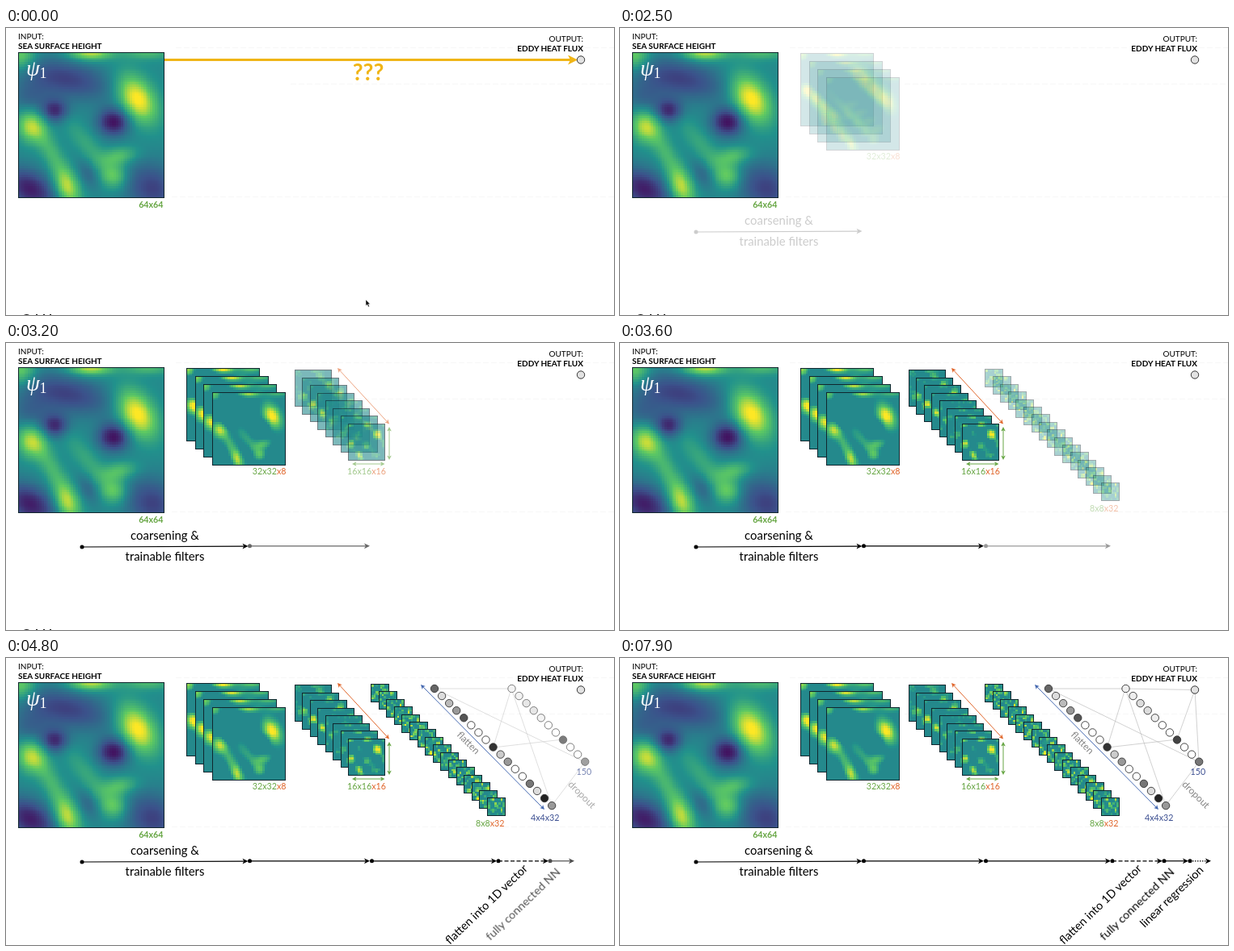
These frames come from a looping animation (752x356 px, 8 s). An HTML page with a canvas:

```html
<!DOCTYPE html>
<html lang="en">
<head>
<meta charset="utf-8">
<title>Eddy heat flux network</title>
<style>
  html, body { margin: 0; width: 100%; height: 100%; overflow: hidden; background: #fff; }
  #stage { position: relative; width: 752px; height: 356px; overflow: hidden; }
  canvas { position: absolute; box-sizing: border-box; border: 1px solid #10262e; image-rendering: pixelated; }
  svg { position: absolute; left: 0; top: 0; }
  text { font-family: Lato, "Open Sans", sans-serif; }
  .title { font-size: 10px; }
  .size { font-size: 10.7px; fill: #67a644; }
  .big { font-size: 14.9px; }
  .slant { font-size: 14.3px; }
  .note { font-size: 12px; fill: #858585; text-anchor: middle; }
  .psi { font-family: "Liberation Serif", serif; fill: #fff; }
  .mid { text-anchor: middle; }
  .end { text-anchor: end; }
  .bold { font-weight: 700; }
  .orange { fill: #e0662b; }
  .blue { fill: #3c4f91; }
</style>
</head>
<body>
<div id="stage">
  <svg width="752" height="356" viewBox="0 0 752 356">
    <path d="M210 24.5H630M716 24.5H752M352 69.5H752M205 209.5H752" stroke="#f7f7f7" stroke-dasharray="7 3"/>
  </svg>
  <div id="tiles"></div>
  <svg width="752" height="356" viewBox="0 0 752 356">
    <path id="caption" d="M22 356q3.5-2 7 0zM37 355h2v1h-2zM46 355h2v1h-2zM54 355h2v1h-2z" fill="#222"/>
    <text class="title" x="15" y="14">INPUT:</text>
    <text class="title bold" x="15" y="25.5">SEA SURFACE HEIGHT</text>
    <text class="title end" x="714" y="17">OUTPUT:</text>
    <text class="title bold end" x="714" y="28.5">EDDY HEAT FLUX</text>
    <text class="size end bold" x="194.5" y="223">64x64</text>
    <text class="psi" x="25" y="59" font-size="27" font-style="italic">ψ</text>
    <text class="psi" x="41.5" y="62" font-size="18">1</text>

    <g id="question">
      <text class="mid bold" x="448" y="65" font-size="28" fill="#f0b516">???</text>
    </g>
    <g id="stage6">
      <text class="slant" transform="translate(649 335) rotate(-44)">linear regression</text>
    </g>
    <g id="stage5">
      <text class="size blue" x="705.5" y="145">150</text>
      <text class="note" transform="translate(709.5 172.5) rotate(45)">dropout</text>
      <text class="slant" transform="translate(599 351) rotate(-44)">fully connected NN</text>
    </g>
    <g id="stage4">
      <text class="size blue" x="649" y="202">4x4x32</text>
      <text class="note" transform="translate(569 108) rotate(45)">flatten</text>
      <text class="slant" transform="translate(549 356) rotate(-44)">flatten into 1D vector</text>
    </g>
    <g id="stage3">
      <text class="size" x="581" y="209">8x8<tspan class="orange">x32</tspan></text>
    </g>
    <g id="stage2">
      <text class="size" x="422" y="163">16x16<tspan class="orange">x16</tspan></text>
    </g>
    <g id="stage1">
      <text class="size end" x="346.5" y="163">32x32<tspan class="orange">x8</tspan></text>
      <text class="big mid" x="196.5" y="244">coarsening &amp;</text>
      <text class="big mid" x="196.5" y="270">trainable filters</text>
    </g>
    <circle cx="711" cy="39.5" r="4.7" fill="#e2e2e2" stroke="#333"/>
    <path id="cursor" d="M445 337v7.5l1.8-1.6 1.3 3 1.3-.6-1.3-2.8h2.3z" fill="#111" stroke="#fff" stroke-width=".4"/>
  </svg>
</div>
<script>
const LOOP = 8000;
const FADE = 500;
const STARTS = [2400, 2900, 3400, 3900, 4450, 5050];
const BASE = 0.47;
const byId = id => document.getElementById(id);
const group = n => byId('stage' + n);
const add = (node, markup) => node.insertAdjacentHTML('afterbegin', markup);

// Timeline helpers

function play(node, frames) {
  node.animate(frames, { duration: LOOP, iterations: Infinity });
}

function fadeIn(node, n) {
  const start = STARTS[n - 1];
  play(node, [
    { opacity: 0, offset: 0 },
    { opacity: 0, offset: start / LOOP, easing: 'steps(10, end)' },
    { opacity: 1, offset: (start + FADE) / LOOP },
    { opacity: 1, offset: 1 }
  ]);
}

function hideAt(node, time) {
  play(node, [
    { opacity: 1, offset: 0, easing: 'step-end' },
    { opacity: 0, offset: time / LOOP },
    { opacity: 0, offset: 1 }
  ]);
}

// Height field and feature maps

const VIRIDIS = [[68, 1, 84], [59, 82, 139], [33, 145, 140], [94, 201, 98], [253, 231, 37]];

function viridis(v) {
  const s = Math.min(0.9999, Math.max(0, v)) * 4;
  const i = Math.floor(s);
  return VIRIDIS[i].map((c, k) => c + (VIRIDIS[i + 1][k] - c) * (s - i));
}

// x, y, height, long radius, short radius, angle
const BLOBS = [
  [147, 57, .57, 31, 20, 58], [16, 92, .43, 20, 17, 60], [40, 124, .18, 30, 12, 62],
  [60, 167, .44, 25, 14, 70], [118, 153, .27, 16, 15, 0], [124, 129, .24, 22, 11, -10],
  [88, 119, .13, 46, 13, 52], [45, 72, -.34, 16, 14, 0], [118, 86, -.42, 19, 17, 0],
  [58, 32, -.27, 58, 23, 12], [14, 56, -.14, 26, 20, 0], [14, 170, -.38, 34, 22, 30],
  [166, 169, -.27, 36, 30, 30], [89, -1, .45, 26, 10, 0], [2, 3, .32, 18, 18, 0],
  [160, -2, .22, 30, 10, 0], [86, 151, -.13, 20, 12, 60]
];

function height(x, y) {
  return BLOBS.reduce((sum, [bx, by, amp, rx, ry, deg]) => {
    const a = deg * Math.PI / 180, dx = x - bx, dy = y - by;
    const u = (dx * Math.cos(a) + dy * Math.sin(a)) / rx;
    const v = (dy * Math.cos(a) - dx * Math.sin(a)) / ry;
    return sum + amp * Math.exp(-u * u - v * v);
  }, 0);
}

let seed = 7;
function random() {
  seed = (seed * 16807) % 2147483647;
  return seed / 2147483647;
}

function tile(x, y, size, cells, value) {
  const canvas = document.createElement('canvas');
  canvas.width = canvas.height = cells;
  canvas.style.cssText = `left:${x}px;top:${y}px;width:${size}px;height:${size}px`;
  const ctx = canvas.getContext('2d');
  const step = 180 / cells;
  for (let j = 0; j < cells; j++) {
    for (let i = 0; i < cells; i++) {
      ctx.fillStyle = `rgb(${viridis(value((i + .5) * step, (j + .5) * step)).map(Math.round)})`;
      ctx.fillRect(i, j, 1, 1);
    }
  }
  byId('tiles').append(canvas);
  return canvas;
}

function stack(n, count, [x0, y0], [x1, y1], size, cells, makeFilter) {
  for (let k = 0; k < count; k++) {
    const p = k / (count - 1);
    fadeIn(tile(x0 + (x1 - x0) * p, y0 + (y1 - y0) * p, size, cells, makeFilter(k)), n);
  }
}

const relu = v => BASE + Math.max(0, v);
const ripple = (x, y, k) => Math.sin(x / 15 + k * 2) * Math.sin(y / 18 + k * 3);

tile(15, 30, 181, 64, (x, y) => BASE + height(x, y));
stack(1, 4, [223, 31], [255, 61], 91, 32, k => (x, y) =>
  relu(height(x, y) * (1.1 + (3 - k) * .12) - .03));
stack(2, 8, [357, 33], [423, 100], 46, 16, k => (x, y) =>
  relu(height(x, y) * .7 + ripple(x, y, k) * .28 + random() * .12 - .12));
stack(3, 16, [451, 32], [595, 173], 23, 8, k => (x, y) =>
  relu(height(x, y) * .4 + ripple(x, y, k) * .25 + random() * .5 - .22));

// Arrows, lines and nodes

function head(x, y, angle, color, long, wide) {
  return `<path transform="translate(${x} ${y}) rotate(${angle})" fill="${color}"
    d="M0 0L${-long} ${-wide}L${-long * .75} 0L${-long} ${wide}z"/>`;
}

function arrow(x1, y1, x2, y2, { color = '#000', width = 1, dash = 'none', both = false, long = 7, wide = 3 } = {}) {
  const angle = Math.atan2(y2 - y1, x2 - x1);
  const deg = angle * 180 / Math.PI;
  const dx = Math.cos(angle) * long * .75, dy = Math.sin(angle) * long * .75;
  const k = both ? 1 : 0;
  return `<path d="M${x1 + dx * k} ${y1 + dy * k}L${x2 - dx} ${y2 - dy}" stroke="${color}"
      stroke-width="${width}" stroke-dasharray="${dash}"/>`
    + head(x2, y2, deg, color, long, wide)
    + (both ? head(x1, y1, deg + 180, color, long, wide) : '');
}

const step = (x1, y1, x2, y2, dash) =>
  `<circle cx="${x1}" cy="${y1}" r="2.5"/>` + arrow(x1, y1, x2, y2, { width: 1.2, dash, wide: 3.4 });

const double = (x1, y1, x2, y2, color) =>
  arrow(x1, y1, x2, y2, { color, both: true, long: 5.5, wide: 2.8 });

const link = d => `<path d="${d}" fill="none" stroke="#bdbdbd" stroke-width=".7"/>`;

// One hex digit of grey per node
function nodes(x, y, greys) {
  return [...greys].map((g, i) =>
    `<circle cx="${x + i * 9.07}" cy="${y + i * 9.07}" r="4.7" fill="#${g.repeat(3)}" stroke="#333" stroke-width=".9"/>`
  ).join('');
}

const GREEN = '#67a644';
add(byId('question'), arrow(196, 39.5, 707, 39.5, { color: '#f0b516', width: 3, long: 12, wide: 6 }));
add(group(1), step(94, 253, 299.5, 252));
add(group(2), step(301.5, 251.8, 450, 251.8)
  + double(410, 31, 474, 100.5, '#e0662b')
  + double(474, 104, 474, 145, GREEN)
  + double(428, 150, 468.5, 150, GREEN));
add(group(3), step(452.5, 251.8, 607, 251.8));
add(group(4), step(609, 251.8, 671, 251.8, '5 2.5')
  + double(513, 33, 666, 188, '#4468b0')
  + nodes(530, 38, '6db95fff3c9ff7d29'));
add(group(5), link('M530 38H625L602.5 111L689 101M530 38L716 129L675 183L625 38')
  + step(673, 251.8, 703, 251.8)
  + nodes(625.5, 38, 'eeddeff4ff7'));
add(group(6), link('M625 38L711 39.5L689 101M711 39.5L716 129')
  + step(705, 251.8, 731, 251.8, '1.5 1.5'));

STARTS.forEach((_, i) => fadeIn(group(i + 1), i + 1));
hideAt(byId('question'), 2500);
hideAt(byId('caption'), 3400);
play(byId('cursor'), [
  { transform: 'translate(0, 0)', offset: 0, easing: 'steps(4, end)' },
  { transform: 'translate(0, 22px)', offset: 400 / LOOP },
  { transform: 'translate(0, 22px)', offset: 1 }
]);
</script>
</body>
</html>
```
